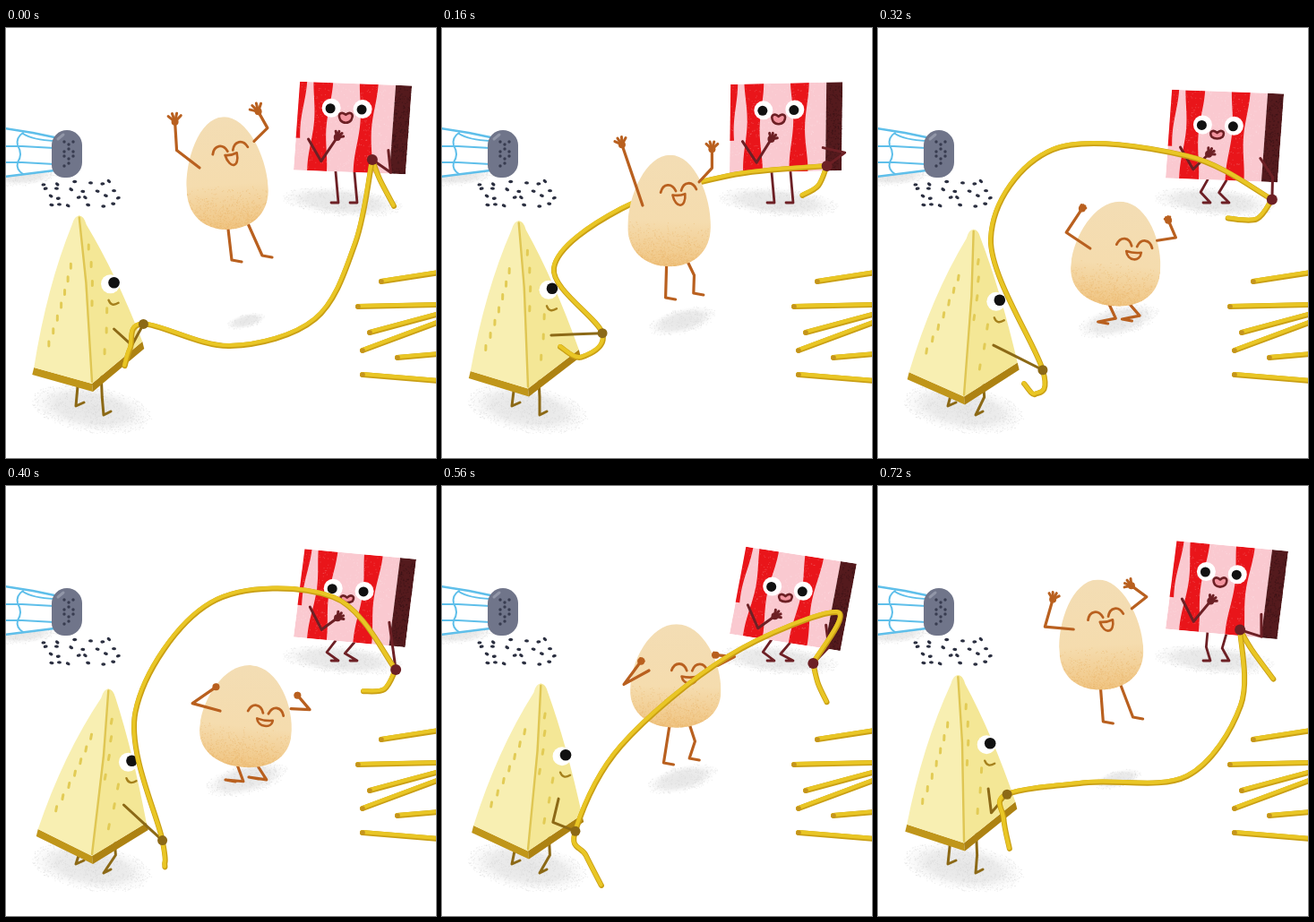
An HTML page with a canvas for the animation above (0.8 s loop, 480 by 480 pixels).

```html
<!DOCTYPE html>
<html lang="en">
<head>
<meta charset="utf-8">
<title>Skipping rope</title>
<style>
html, body { margin: 0; width: 100%; height: 100%; overflow: hidden; background: #fff; }
canvas { display: block; width: 480px; height: 480px; }
</style>
</head>
<body>
<canvas id="stage" width="480" height="480"></canvas>
<script>
const ctx = document.getElementById('stage').getContext('2d');
const TAU = Math.PI * 2, STEPS = 10, STEP_MS = 80;
const BROWN = '#b9601f', OLIVE = '#8c6916', MAROON = '#6d2025';

// The jump: height of the egg's centre at each step
const jump = [162, 178, 204, 233, 252, 257, 248, 212, 175, 166];
// Three points of the rope at steps 0, 2, 4, 6, 7, 8 and 9
const ropeKeys = [
  [250, 355, 345, 325, 390, 240],
  [125, 268, 200, 202, 320, 165],
  [126, 235, 195, 136, 345, 143],
  [163, 270, 262, 125, 385, 105],
  [200, 290, 320, 190, 441, 141],
  [225, 319, 345, 297, 438, 247],
  [235, 331, 345, 324, 405, 245]
];
const strands = [[419, 283, 484, 273], [393, 311, 484, 309], [406, 340, 484, 319],
  [398, 360, 484, 328], [437, 368, 484, 364], [398, 387, 484, 394]];

let step = -1, seed;
const random = () => (seed = (seed * 16807) % 2147483647) / 2147483647;
const mix = (a, b, t) => a + (b - a) * t;

// Once per loop: swings by amp around mean, highest at the step peak
const swing = (mean, amp, peak) => mean + amp * Math.cos(TAU * (step - peak) / STEPS);
const sink = (mean, amp) => swing(mean, amp, 5);
const lean = (mean, amp) => swing(mean, amp, 5.7);

// Knee or elbow of a limb with two bones of equal length
function limb([x0, y0], [x1, y1], bone, side) {
  const dx = x1 - x0, dy = y1 - y0, d = Math.hypot(dx, dy);
  const h = side * Math.sqrt(Math.max(0, bone * bone - d * d / 4)) / d;
  return [x0, y0, (x0 + x1) / 2 - dy * h, (y0 + y1) / 2 + dx * h, x1, y1];
}

function trace(p) {
  ctx.beginPath();
  for (let i = 0; i < p.length; i += 2) ctx.lineTo(p[i], p[i + 1]);
}
function stroke(color, width) {
  ctx.strokeStyle = color;
  ctx.lineWidth = width;
  ctx.stroke();
}
function paint(color) {
  ctx.fillStyle = color;
  ctx.fill();
}
function line(p, color, width = 3.2) {
  trace(p);
  stroke(color, width);
}
function fill(p, color) {
  trace(p);
  paint(color);
}
function dot(x, y, rx, color, ry = rx, tilt = 0) {
  ctx.beginPath();
  ctx.ellipse(x, y, rx, ry, tilt, 0, TAU);
  paint(color);
}
function local(x, y, degrees, draw) {
  ctx.save();
  ctx.translate(x, y);
  ctx.rotate(degrees * TAU / 360);
  draw();
  ctx.restore();
}

function shadow(x, y, rx, ry, degrees) {
  local(x, y, degrees, () => {
    ctx.save();
    ctx.scale(rx, ry);
    const g = ctx.createRadialGradient(0, 0, 0, 0, 0, 1);
    g.addColorStop(0, '#e6e6e6');
    g.addColorStop(.6, '#ececec');
    g.addColorStop(1, '#f6f6f600');
    dot(0, 0, 1, g);
    ctx.restore();
    ctx.fillStyle = '#d4d4d470';
    for (let i = rx * ry * .5; i > 0; i--) {
      const a = random() * TAU, r = Math.sqrt(random());
      ctx.fillRect(Math.cos(a) * r * rx, Math.sin(a) * r * ry, 1, 1);
    }
  });
}

// Fingers spread along the forearm, the last two points of an arm
function hand(arm, length, color) {
  const [ex, ey, x, y] = arm.slice(-4);
  dot(x, y, 4, color);
  for (let i = -1.5; i < 2; i++) {
    const a = Math.atan2(y - ey, x - ex) + i * .55;
    line([x, y, x + Math.cos(a) * length, y + Math.sin(a) * length], color, 3);
  }
}

function shaker() {
  const blue = '#5fbfea';
  shadow(16, 164, 42, 12, -2);
  fill([0, 112, 54, 122, 54, 160, 0, 166], '#fff');
  line([-2, 112, 30, 117, 54, 122], blue, 2.5);
  line([-2, 166, 54, 159], blue, 2.5);
  for (const y of [132, 150]) line([-2, y, 18, y, 54, y + 2], blue, 2);
  ctx.beginPath();
  ctx.moveTo(19, 117);
  ctx.quadraticCurveTo(11, 122, 13, 131);
  ctx.quadraticCurveTo(19, 141, 13, 150);
  ctx.quadraticCurveTo(11, 158, 19, 163);
  ctx.moveTo(19, 118);
  ctx.quadraticCurveTo(30, 125, 54, 126);
  stroke(blue, 2);
  ctx.beginPath();
  ctx.roundRect(51, 114, 34, 53, [17, 17, 17, 14]);
  paint('#70758a');
  line([58, 124, 64, 119], '#9297a8', 3);
  for (let i = 0; i < 11; i++)
    dot(65 + i % 3 * 5, 127 + Math.floor(i / 3) * 8 + i % 2 * 3, 1.7, '#383c50');
  for (let i = 0; i < 24; i++)
    dot(38 + i % 6 * 15 + random() * 14, 171 + Math.floor(i / 6) * 8 + random() * 5,
      2.5, '#2b2f40', 1.7, random() - .3);
}

function pasta(path) {
  path();
  stroke('#c99f14', 6);
  ctx.save();
  ctx.translate(-.5, -.8);
  path();
  stroke('#e9c625', 4.2);
  ctx.restore();
}

// Catmull-Rom curve through the points
function curve(points) {
  const at = i => points[Math.max(0, Math.min(points.length - 1, i))];
  ctx.beginPath();
  ctx.moveTo(...points[0]);
  for (let i = 0; i < points.length - 1; i++) {
    const [a, b, c, d] = [at(i - 1), at(i), at(i + 1), at(i + 2)];
    ctx.bezierCurveTo(b[0] + (c[0] - a[0]) / 6, b[1] + (c[1] - a[1]) / 6,
      c[0] - (d[0] - b[0]) / 6, c[1] - (d[1] - b[1]) / 6, ...c);
  }
}

const cheeseHand = () => [swing(164, 22, 3.3), swing(363, 35, 5.6)];
const baconHand = () => [swing(422, 18, 3.8), swing(176, 32, 5.7)];

function rope() {
  const k = step < 7 ? step / 2 : step - 3;
  const from = ropeKeys[Math.floor(k)], to = ropeKeys[Math.ceil(k)];
  const p = from.map((v, i) => mix(v, to[i], k % 1));
  const [x0, y0] = cheeseHand(), [x1, y1] = baconHand();
  const flick = swing(-6, 44, 8.7);
  pasta(() => curve([[x1, y1], [x1 + flick * .35, y1 + 22], [x1 + flick, y1 + swing(38, 17, 9)]]));
  pasta(() => curve([
    [x0 + swing(-9, 38, 7), y0 + swing(38, 28, 8)], [x0 + swing(-6, 18, 6.7), y0 + 27], [x0, y0],
    p.slice(0, 2), p.slice(2, 4), p.slice(4), [x1, y1]
  ]));
  dot(x0, y0, 5.5, OLIVE);
  dot(x1, y1, 6, MAROON);
}

function cheese() {
  const ax = lean(98, 18), ay = sink(218, 8.5);
  const lx = lean(33.5, 2.5), ly = swing(381, 3.5, 3.5);
  const mx = 96, my = sink(405, 8);
  const rx = lean(154.5, 2.5), ry = sink(363, 13);
  const hip = lean(.3, .13), hipX = mix(mx, rx, hip);
  line([mix(lx, mx, .76), my - 2, 78, 422, 87, 418], OLIVE, 3);
  line([hipX, mix(my, ry, hip), hipX + 1, 412, 109, 432, 117, 428], OLIVE, 3);
  fill([lx, ly, mx, my, mx + 1, my + 9, lx - 2, ly + 8], '#c0961a');
  fill([mx, my, rx, ry, rx + 2, ry + 8, mx + 1, my + 9], '#ad8212');

  const side = (dir, x, y, bulge, color) => {
    ctx.beginPath();
    ctx.moveTo(mx, my);
    ctx.lineTo(ax - dir, ay);
    ctx.quadraticCurveTo(ax + 5 * dir, ay - 1, ax + 8 * dir, ay + 10);
    ctx.quadraticCurveTo((ax + x) / 2 + bulge * dir, (ay + y) / 2 - 5, x, y);
    paint(color);
  };
  side(1, rx, ry, 6, '#f4e796');
  side(-1, lx, ly, 11, '#f8efb2');
  line([ax, ay + 2, mix(ax, mx, .4) + 2, mix(ay, my, .4), mx, my - 2], '#dfc653', 2.4);

  const hole = (u, v, x0, y0, x1, y1) => {
    const x = mix(ax, mix(x0, x1, v), u), y = mix(ay, mix(y0, y1, v), u);
    line([x, y - 2.5, x - lean(.5, .5), y + 2.5], '#e2cb55', 3);
  };
  for (let i = 0; i < 7; i++) {
    hole(.32 + i * .085, .08 + (i * .37 + .25) % .4, lx, ly, mx, my);
    hole(.22 + i * .11, .2 + (i * .37 + .4) % .5, mx, my, rx, ry);
  }

  const ex = ax + lean(28.5, -7), ey = ay + lean(79, 3);
  dot(ex, ey, 10.5, '#fff');
  dot(ex + 4, ey - 1.5, 6.3, '#111');
  ctx.beginPath();
  ctx.moveTo(ex - 2, ey + 18);
  ctx.quadraticCurveTo(ex + 1, ey + 26, ex + 9, ey + 21);
  stroke('#a5801c', 2.4);
  line(limb([lean(126, 6), sink(346, 10)], cheeseHand(), 27, 1), OLIVE, 3);
}

function bacon() {
  const width = 125, height = 99, meat = 107;
  const tilt = swing(3.7, 5, 7) * TAU / 360, y0 = sink(163.5, 5);
  const axes = [Math.cos(tilt), Math.sin(tilt), -Math.sin(tilt + .035), Math.cos(tilt + .035)];
  // u runs right and v down from the bottom left corner
  const place = (u, v) => [321 + axes[0] * u + axes[2] * v, y0 + axes[1] * u + axes[3] * v];

  for (const foot of [371, 392])
    line([...limb(place(foot - 324, 0), [foot, 195], 16, 1), foot - 8, 195], MAROON, 2.8);

  ctx.save();
  ctx.transform(...axes, 321, y0);
  ctx.translate(0, -height);
  ctx.beginPath();
  ctx.rect(0, 0, width, height);
  ctx.clip();
  ctx.fillStyle = '#fac9d0';
  ctx.fillRect(0, 0, meat, height);
  for (const [x, half, bottom] of [[-2, 8, 64], [26, 9, height], [77, 8.5, height]]) {
    const edge = [];
    for (let y = 0; y <= bottom; y += 3) {
      edge.push(x + half + 2 * Math.cos(y / 16), y);
      edge.unshift(x - half - 2 * Math.cos(y / 16 + .5), y);
    }
    fill(edge, '#e9151a');
  }
  ctx.fillStyle = '#541a1d';
  ctx.fillRect(meat, 0, width - meat, height);
  ctx.fillStyle = '#35101480';
  for (let i = 0; i < 250; i++) ctx.fillRect(mix(meat, width, random()), random() * height, 1.2, 1.2);
  ctx.fillStyle = '#ffffff30';
  for (let i = 0; i < 500; i++) ctx.fillRect(random() * meat, random() * height, 1, 1);
  ctx.restore();

  const face = lean(34.5, 7) - height;
  for (const u of [37, 72]) {
    const [x, y] = place(u, face);
    dot(x, y, 10.5, '#fff');
    dot(x - 1, y + .5, 5.5, '#111');
  }
  const [x, y] = place(54, face + 11), h = lean(5, -1);
  ctx.beginPath();
  ctx.moveTo(x, y - h + 2);
  ctx.bezierCurveTo(x + 4, y - h - 2, x + 10, y - h, x + 6, y + 2);
  ctx.bezierCurveTo(x + 3, y + h, x - 3, y + h, x - 6, y + 2);
  ctx.bezierCurveTo(x - 10, y - h, x - 4, y - h - 2, x, y - h + 2);
  paint('#f3949f');
  stroke(MAROON, 2.6);

  const arm = [...place(14, -35), ...place(30, -11), ...place(46, lean(-32, 7))];
  line(arm, MAROON, 3);
  hand(arm, 7, MAROON);
  line(limb(place(104, -26), baconHand(), 25, -1), MAROON, 3);
}

function egg() {
  const x = sink(257.5, 11.5), y = jump[step];
  const rx = lean(48.5, 3.2), ry = 108.5 - rx;
  const at = (dx, dy) => [x + dx, y + dy];

  const leg = (hipX, ankleX, reach, ground) => {
    const ankle = [x + ankleX, Math.min(y + reach, ground)];
    line([...limb(at(hipX, 54), ankle, 20, -1), ankle[0] + 11, ankle[1] + 2], BROWN);
  };
  leg(sink(-5, -6), sink(-9, -15), 97, 328);
  leg(sink(17, -6), sink(21, -19), 92, 325);

  local(x, y, swing(1, 5, 4.5), () => {
    const body = new Path2D();
    for (const s of [rx, -rx]) {
      body.moveTo(0, -ry);
      body.bezierCurveTo(s * .58, -ry, s, -ry * .28, s, ry * .28);
      body.bezierCurveTo(s, ry * .74, s * .58, ry, 0, ry);
    }
    const g = ctx.createLinearGradient(0, -ry, 0, ry);
    g.addColorStop(0, '#f3ddb4');
    g.addColorStop(.6, '#f5dcae');
    g.addColorStop(1, '#f0c583');
    ctx.save();
    ctx.clip(body);
    ctx.fillStyle = g;
    ctx.fillRect(-rx, -ry, rx * 2, ry * 2);
    ctx.fillStyle = '#e9b56a70';
    for (let i = 0; i < 1200; i++)
      ctx.fillRect((random() * 2 - 1) * rx, ry * (1 - random() * random() * .85), 1, 1);
    ctx.restore();
  });

  const mw = lean(7.8, 1.2), mh = lean(11.5, -3.5);
  local(x + sink(12.5, 9), y + lean(-18, 12), sink(-2, 10), () => {
    for (const eye of [-11.5, 11.5]) {
      ctx.beginPath();
      ctx.moveTo(eye - 8.5, 4);
      ctx.bezierCurveTo(eye - 5, -6, eye + 5, -6, eye + 8.5, 4);
      stroke(BROWN, 2.8);
    }
    ctx.beginPath();
    ctx.moveTo(-mw, 15 - mh / 2);
    ctx.quadraticCurveTo(0, 17 - mh / 2, mw, 15 - mh / 2);
    ctx.bezierCurveTo(mw, 15 + mh * .65, 2 - mw, 15 + mh * .65, -mw, 15 - mh / 2);
    ctx.closePath();
    paint('#f7d9b0');
    stroke(BROWN, 2.6);
  });

  const left = limb(at(-30, -6), at(swing(-46, 12, 5.5), swing(-45, 29, 6.8)), 32, -1);
  const right = limb(at(lean(40, 10), lean(-22, 15)), at(swing(46, 11.5, 4.3), swing(-46, 28, 6)), 21, 1);
  for (const arm of [left, right]) {
    line(arm, BROWN);
    hand(arm, lean(6, -4), BROWN);
  }
}

function draw() {
  seed = 77;
  ctx.fillStyle = '#fff';
  ctx.fillRect(0, 0, 480, 480);
  ctx.lineCap = ctx.lineJoin = 'round';
  const size = 22 + 25 * Math.sqrt((jump[step] - 162) / 95);
  shaker();
  shadow(95, 425, 68, 26, 9);
  shadow(375, 194, 68, 16, 5);
  shadow(268, 327, size, size * .36, -14);
  for (const s of strands) {
    pasta(() => trace(s));
    dot(s[0], s[1], 2.8, '#c4941c');
  }
  bacon();
  cheese();
  const ropeBehind = step >= 1 && step <= 3;
  for (const part of ropeBehind ? [rope, egg] : [egg, rope]) part();
}

function tick() {
  const now = Math.floor(performance.now() / STEP_MS) % STEPS;
  if (now !== step) {
    step = now;
    draw();
  }
  requestAnimationFrame(tick);
}
tick();
</script>
</body>
</html>
```
